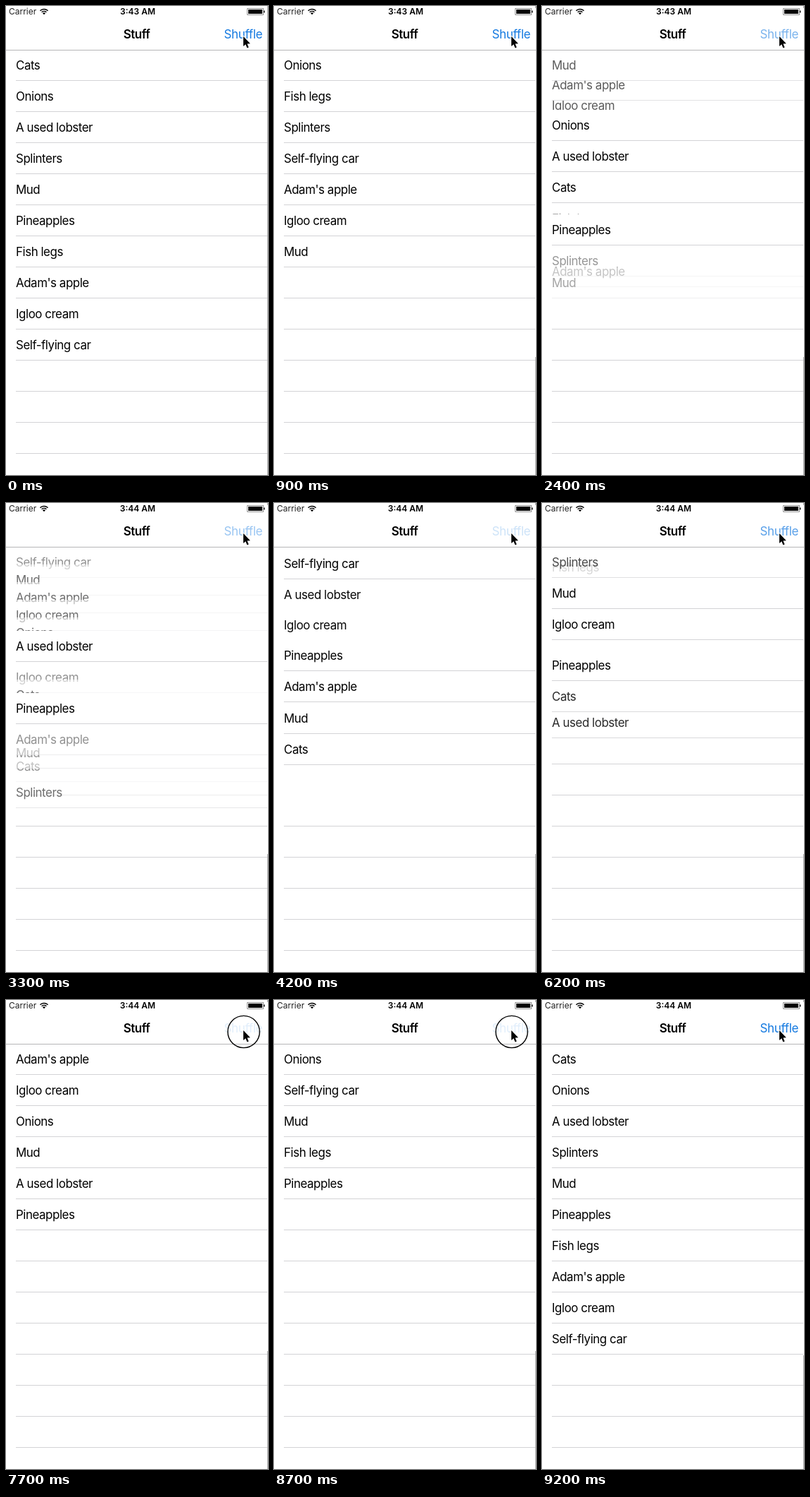
An HTML page with a canvas for the animation above (9600 ms loop, 372 by 664 pixels).

```html
<!DOCTYPE html>
<html lang="en">
<head>
<meta charset="utf-8">
<title>Stuff</title>
<style>
html, body { margin: 0; width: 100%; height: 100%; overflow: hidden; background: #fff; }
canvas { display: block; }
</style>
</head>
<body>
<canvas id="stage" width="372" height="664"></canvas>
<script>
const LOOP = 9600, TOP = 62, ROW = 44, MOVE = 300, FADE = 380;
const ctx = document.getElementById('stage').getContext('2d');

const stuff = ['Cats', 'Onions', 'A used lobster', 'Splinters', 'Mud', 'Pineapples',
  'Fish legs', "Adam's apple", 'Igloo cream', 'Self-flying car'];
// Each list is a string of indices into stuff.
const lists = ['0123456789', '1639784', '1206574', '47812053', '9285740', '36957140',
  '648925', '348502', '781425', '19465', '0123456789'];
// Press time and the delay until release.
const taps = [[300, 105], [1200, 110], [2100, 122], [3000, 165], [3900, 273],
  [4800, 110], [5900, 77], [6800, 100], [7700, 110], [8700, 100]];

const ease = u => { u = Math.min(1, Math.max(0, u)); return u * u * (3 - 2 * u); };

// Longest common subsequence as [old index, new index] pairs.
function common(a, b) {
  const len = Array.from({ length: a.length + 1 }, () => Array(b.length + 1).fill(0));
  for (let i = 1; i <= a.length; i++)
    for (let j = 1; j <= b.length; j++)
      len[i][j] = a[i - 1] === b[j - 1] ? len[i - 1][j - 1] + 1
        : Math.max(len[i - 1][j], len[i][j - 1]);
  const pairs = [];
  let i = a.length, j = b.length;
  while (i && j) {
    if (a[i - 1] === b[j - 1]) pairs.unshift([--i, --j]);
    else if (len[i][j - 1] === len[i][j]) j--;
    else i--;
  }
  return pairs;
}

// Rows that stay slide, inserted rows fade in, deleted rows fade out.
function plan(a, b) {
  const kept = [], added = [], gone = [];
  let pi = -1, pj = -1;
  for (const [i, j] of [...common(a, b), [a.length, b.length]]) {
    for (let n = pj + 1; n < j; n++) added.unshift({ id: b[n], from: pi + 1, to: n, kind: 1 });
    for (let n = pi + 1; n < i; n++) gone.push({ id: a[n], from: n + j - pj - 1, to: pj + 1, kind: -1 });
    if (i < a.length) kept.push({ id: a[i], from: i, to: j, kind: 0 });
    pi = i;
    pj = j;
  }
  return [...added, ...gone, ...kept];
}
const plans = taps.map((_, k) => plan(lists[k], lists[k + 1]));

function rect(color, x, y, w, h) {
  ctx.fillStyle = color;
  ctx.fillRect(x, y, w, h);
}

function text(str, x, y, size, { color = '#000', weight = 400, align = 'left', gap = 0 } = {}) {
  ctx.font = `${weight} ${size}px Inter, "Open Sans", sans-serif`;
  ctx.letterSpacing = gap + 'px';
  ctx.textAlign = align;
  ctx.fillStyle = color;
  ctx.fillText(str, x, y);
}

const separator = y => rect('#d3d3d6', 14, y, 357, 1);

function cell(id, slot, alpha) {
  const y = Math.round(TOP + ROW * slot);
  ctx.globalAlpha = alpha;
  rect('#fff', 0, y, 371, ROW);
  text(stuff[id], 14, y + 28, 16.9, { gap: -0.45 });
  separator(y + ROW - 1);
  ctx.globalAlpha = 1;
}

function wifi() {
  ctx.strokeStyle = '#000';
  ctx.lineWidth = 1.5;
  for (const r of [4.6, 7.6]) {
    ctx.beginPath();
    ctx.arc(54, 12, r, -Math.PI * 0.76, -Math.PI * 0.24);
    ctx.stroke();
  }
  ctx.fillStyle = '#000';
  ctx.beginPath();
  ctx.moveTo(54, 12.3);
  ctx.arc(54, 12, 2.6, -Math.PI * 0.78, -Math.PI * 0.22);
  ctx.fill();
}

function battery() {
  ctx.strokeStyle = '#777';
  ctx.lineWidth = 0.8;
  ctx.strokeRect(342.5, 3.5, 23, 9);
  rect('#000', 344, 5, 20, 6);
  rect('#000', 366, 6.5, 1.3, 3);
}

function cursor() {
  const points = [[337, 43], [337, 57], [340.2, 54.2], [342.4, 59.4], [344.6, 58.4], [342.4, 53.4], [346.8, 53.2]];
  ctx.beginPath();
  points.forEach(p => ctx.lineTo(...p));
  ctx.closePath();
  ctx.lineJoin = 'round';
  ctx.strokeStyle = '#fff';
  ctx.lineWidth = 2;
  ctx.stroke();
  ctx.fillStyle = '#000';
  ctx.fill();
}

function drawRows(k, p) {
  const list = p > 0 ? lists[k + 1] : lists[Math.max(k, 0)];
  for (let n = list.length; n < 14; n++) separator(TOP + ROW * (n + 1) - 1);
  if (p > 0 && p < 1) {
    for (const { id, from, to, kind } of plans[k])
      cell(id, from + (to - from) * p, kind > 0 ? p : kind < 0 ? 1 - p : 1);
  } else {
    [...list].forEach((id, n) => cell(id, n, 1));
  }
}

function drawBars(t, pressed, sinceRelease) {
  rect('#fff', 0, 0, 372, TOP);
  rect('#b6b6b8', 0, TOP, 372, 1);
  text('Carrier', 4, 12.4, 12, { color: '#222' });
  wifi();
  text(t < 2600 ? '3:43 AM' : '3:44 AM', 187, 12.4, 12, { weight: 600, align: 'center' });
  battery();
  text('Stuff', 185.5, 46, 16.9, { weight: 600, align: 'center', gap: -0.4 });
  ctx.globalAlpha = pressed ? 0.13 : 0.2 + 0.8 * ease(sinceRelease / FADE);
  text('Shuffle', 364, 46, 16.9, { color: '#1479e0', align: 'right', gap: -0.3 });
  ctx.globalAlpha = 1;
  if (pressed) {
    ctx.strokeStyle = '#000';
    ctx.lineWidth = 1.4;
    ctx.beginPath();
    ctx.arc(337.5, 45, 22.6, 0, Math.PI * 2);
    ctx.stroke();
  }
  cursor();
}

function drawEdge(t) {
  const y = t < 405 ? 0 : t < 8800 ? 497 : 503;
  rect('#a8a8a8', 371, y, 1, 664 - y);
  rect('#a8a8a8', 371, 0, 1, 3);
}

function draw(t) {
  rect('#fff', 0, 0, 372, 664);
  const k = taps.filter(([start]) => t >= start).length - 1;
  const since = k < 0 ? -1 : t - taps[k][0] - taps[k][1];
  drawRows(k, k < 0 ? 0 : ease(since / MOVE));
  drawBars(t, k >= 0 && since < 0, k < 0 ? FADE : since);
  drawEdge(t);
}

const begin = performance.now();
function tick() {
  draw((performance.now() - begin) % LOOP);
  requestAnimationFrame(tick);
}
tick();
</script>
</body>
</html>
```
